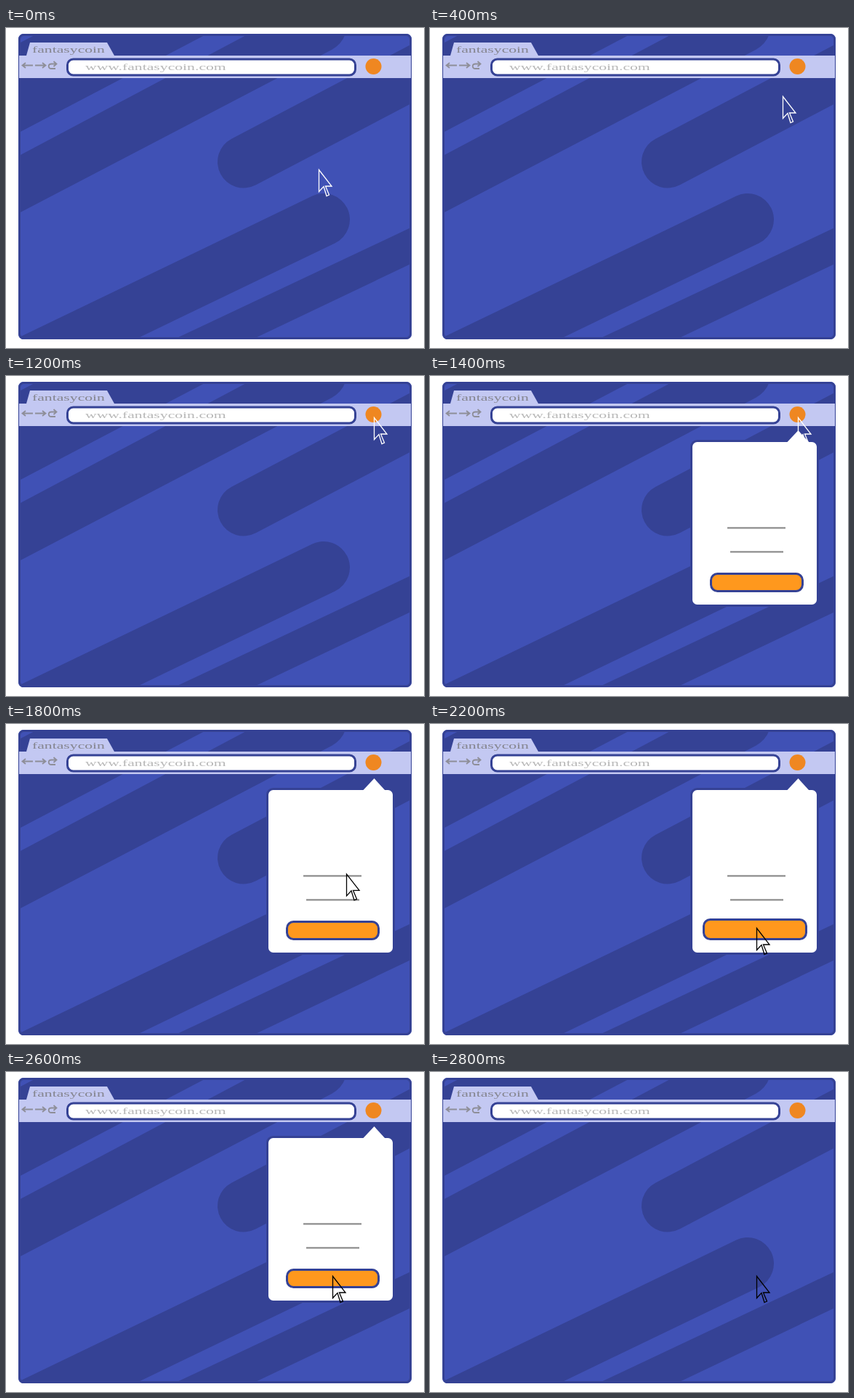
These frames come from a looping animation (575 by 441 pixels, 3000 ms). An HTML page:

```html
<!DOCTYPE html>
<html lang="en">
<head>
<meta charset="utf-8">
<title>Browser wallet popup</title>
<style>
  html, body { margin: 0; width: 100%; height: 100%; overflow: hidden; background: #fff; }
  svg { display: block; }
  text { font: 13px "Liberation Serif", "Times New Roman", serif; }
  .dark { fill: #354295; }
  .frame { stroke: #354295; stroke-width: 3; }
  .nav { fill: none; stroke: #8e8e98; stroke-width: 1.8; }
</style>
</head>
<body>
<svg width="575" height="441" viewBox="0 0 575 441">
  <clipPath id="window"><rect x="17" y="8" width="541" height="421" rx="7"/></clipPath>

  <g clip-path="url(#window)">
    <rect x="17" y="8" width="541" height="421" fill="#4051b5"/>
    <g class="dark">
      <path d="M17 21.500L43 8H277L17 144.500Z"/>
      <path d="M17 176.500L334 8H467Q462 22 448 30L17 255.500Z"/>
      <path d="M558 274.500L229 430H337L558 324.500Z"/>
    </g>
    <g stroke="#354295" stroke-width="72" stroke-linecap="round">
      <path d="M327 184.500L627 26.700"/>
      <path d="M437 264L0 475"/>
    </g>
  </g>
  <rect class="frame" x="18.500" y="9.500" width="538" height="418" rx="6" fill="none"/>

  <path d="M18 69V38H28L33 20H139L149 38H557V69Z" fill="#c3c8f2"/>
  <g class="nav">
    <path d="M37 51.500H23M27 48L22.500 51.500L27 55"/>
    <path d="M40 51.500H54M50 48L54.500 51.500L50 55"/>
    <path d="M69 49.500H62.500C57.500 49.500 57.500 56 62.500 56H68M65.500 46L69.500 49.500L65.500 53"/>
  </g>
  <rect class="frame" x="84.500" y="43" width="396" height="22" rx="8" fill="#fff"/>
  <text transform="translate(36 34) scale(1.67 1)" fill="#85858f">fantasycoin</text>
  <text transform="translate(109 58) scale(1.67 1)" fill="#b8b8b8">www.fantasycoin.com</text>
  <circle cx="505.500" cy="53" r="11" fill="#ef8721"/>

  <g id="popup">
    <rect class="frame" x="359.500" y="89.500" width="174" height="227" rx="8" fill="#fff"/>
    <path d="M491 91.500L506.500 75L521.500 91.500Z" fill="#fff"/>
    <path d="M409 209.300H489M413 242.300H486" stroke="#8e8e8e" stroke-width="2.200"/>
    <rect id="button" class="frame" rx="9" fill="#ff981d"/>
  </g>

  <path id="cursor" d="M0 0V30L6.500 23L10.500 36L14 34.500L9 22.500H17.500Z" fill="none" stroke-width="1.300"/>
</svg>
<script>
const LOOP = 3000, STEP = 200;
const [popup, button, cursor] = ["popup", "button", "cursor"].map(id => document.getElementById(id));

// Cursor stops: time, x, y
const stops = [
  [0, 430.5, 195.5], [400, 485.5, 94.5], [600, 506.5, 57.5],
  [1400, 506.5, 57.5], [2000, 449.5, 281.5], [LOOP, 449.5, 281.5]
];

function cursorAt(t) {
  const i = stops.findIndex(stop => stop[0] > t);
  const [t0, x0, y0] = stops[i - 1], [t1, x1, y1] = stops[i];
  const k = (t - t0) / (t1 - t0);
  return [x0 + (x1 - x0) * k, y0 + (y1 - y0) * k];
}

function set(el, attrs) {
  for (const name in attrs) el.setAttribute(name, attrs[name]);
}

function draw(now) {
  const t = Math.floor(now % LOOP / STEP) * STEP;
  const open = t >= 1400 && t < 2800;
  const grown = t >= 2200 && t < 2400;
  set(popup, { visibility: open ? "visible" : "hidden" });
  set(button, grown
    ? { x: 376.5, y: 269.5, width: 141, height: 27 }
    : { x: 386.5, y: 272.5, width: 126, height: 24 });
  set(cursor, {
    transform: `translate(${cursorAt(t)})`,
    stroke: t < 1600 ? "#fff" : "#000"
  });
}

const start = performance.now();
function tick() {
  draw(performance.now() - start);
  requestAnimationFrame(tick);
}
tick();
</script>
</body>
</html>
```
